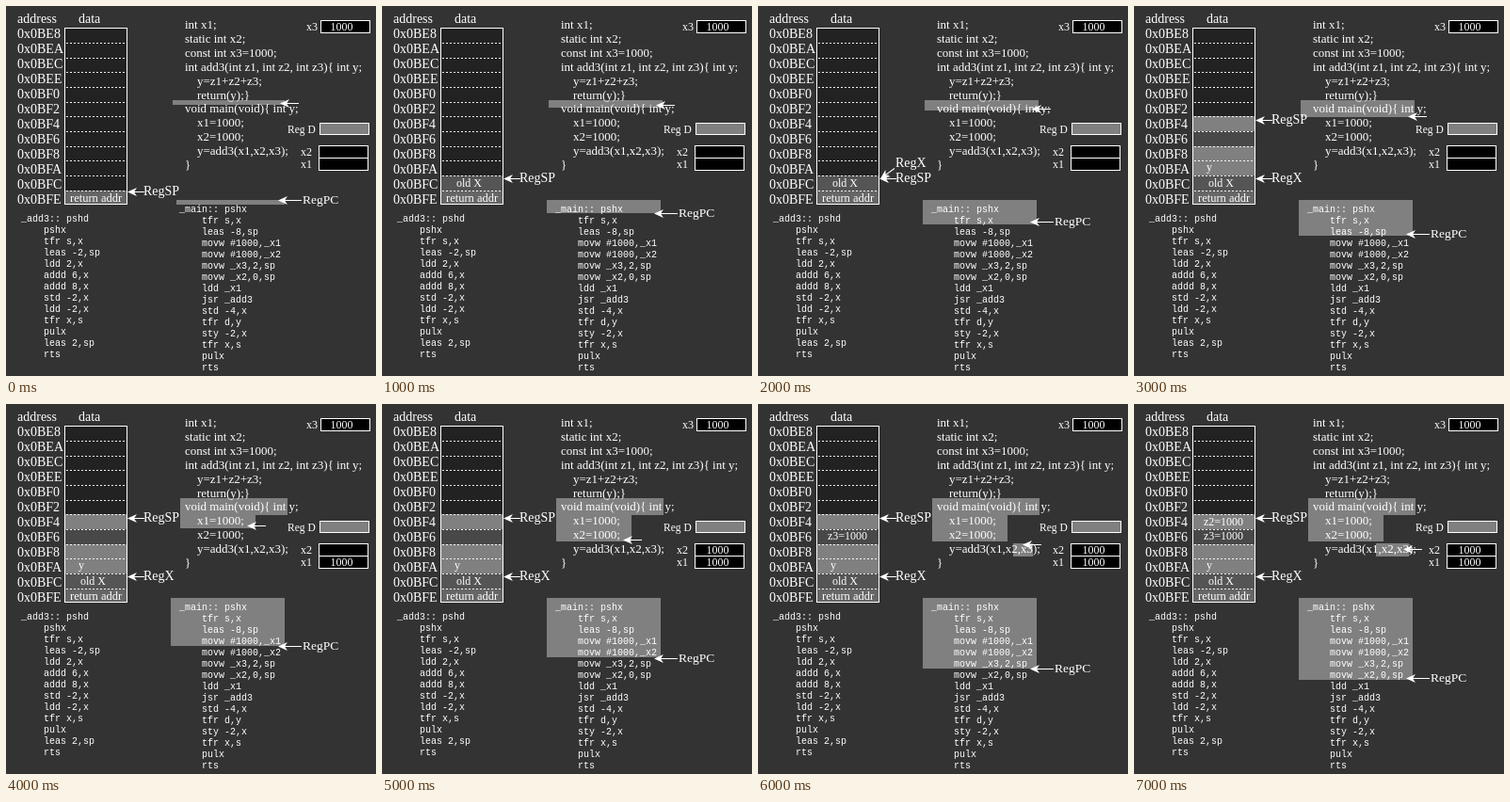
Recreate the animation shown at these times as an HTML page with a canvas. Size 393 by 393 pixels, loop 8000 ms.

```html
<!DOCTYPE html>
<html lang="en">
<head>
<meta charset="utf-8">
<title>Function call on a stack</title>
<style>
html, body { margin: 0; width: 100%; height: 100%; overflow: hidden; background: #333; }
canvas { display: block; }
</style>
</head>
<body>
<canvas id="stage" width="393" height="393"></canvas>
<script>
const ctx = document.getElementById('stage').getContext('2d');
const SERIF = '"Liberation Serif", serif';
const MONO = '"Liberation Mono", monospace';
const GRAY = '#808080';

const sourceLines = [
  'int x1;', 'static int x2;', 'const int x3=1000;',
  'int add3(int z1, int z2, int z3){ int y;',
  '    y=z1+z2+z3;', '    return(y);}', 'void main(void){ int y;',
  '    x1=1000;', '    x2=1000;', '    y=add3(x1,x2,x3);', '}'
];
const addCode = ['_add3:: pshd', 'pshx', 'tfr s,x', 'leas -2,sp', 'ldd 2,x',
  'addd 6,x', 'addd 8,x', 'std -2,x', 'ldd -2,x', 'tfr x,s', 'pulx', 'leas 2,sp', 'rts'];
const mainCode = ['_main:: pshx', 'tfr s,x', 'leas -8,sp', 'movw #1000,_x1',
  'movw #1000,_x2', 'movw _x3,2,sp', 'movw _x2,0,sp', 'ldd _x1', 'jsr _add3',
  'std -4,x', 'tfr d,y', 'sty -2,x', 'tfr x,s', 'pulx', 'rts'];

const mainHead = [185, 100, 299, 118];
const assignments = [185, 118, 265, 146];

// pc: program counter height; end: bottom of the listing highlight;
// src: source highlights; at: source arrow tip
const steps = [
  { pc: 206, end: 211, src: [[177, 100, 296, 105]], at: [291, 103] },
  { pc: 220, end: 220, src: [[177, 100, 298, 108]], at: [291, 105] },
  { pc: 229, end: 232, src: [[177, 100, 298, 111]], at: [291, 109] },
  { pc: 242, end: 244, src: [[177, 100, 298, 118]], at: [291, 117] },
  { pc: 257, end: 257, src: [mainHead, [185, 118, 265, 132]], at: [256, 129] },
  { pc: 270, end: 269, src: [mainHead, assignments], at: [256, 144] },
  { pc: 281, end: 281, src: [mainHead, assignments, [271, 148, 292, 162]], at: [281, 149] },
  { pc: 291, end: 293, src: [mainHead, assignments, [257, 148, 292, 162]], at: [286, 154] }
];

function text(str, x, y, size = 12, family = SERIF) {
  ctx.font = `${size}px ${family}`;
  ctx.fillStyle = '#fff';
  ctx.fillText(str, x, y);
}

function fill(x1, y1, x2, y2, color = GRAY) {
  ctx.fillStyle = color;
  ctx.fillRect(x1, y1, x2 - x1, y2 - y1);
}

function box(x1, y1, x2, y2, color) {
  fill(x1, y1, x2, y2, color);
  ctx.strokeRect(x1 + 0.5, y1 + 0.5, x2 - x1 - 1, y2 - y1 - 1);
}

function arrow(tipX, tipY, tailX, tailY = tipY) {
  ctx.save();
  ctx.translate(tipX, tipY + 0.5);
  ctx.rotate(Math.atan2(tailY - tipY, tailX - tipX));
  ctx.beginPath();
  ctx.moveTo(1, 0);
  ctx.lineTo(Math.hypot(tailX - tipX, tailY - tipY), 0);
  ctx.stroke();
  ctx.beginPath();
  ctx.moveTo(0, 0);
  ctx.lineTo(10, -4.5);
  ctx.lineTo(7, 0);
  ctx.lineTo(10, 4.5);
  ctx.fillStyle = '#fff';
  ctx.fill();
  ctx.restore();
}

function listing(lines, x, y) {
  lines.forEach((line, i) => text(line, i ? x + 24 : x, y + 12 * i, 10, MONO));
}

function drawStack(step) {
  const rowTop = row => Math.min(210, Math.floor(23.6 + 15.7 * row));
  const cell = (row, color) => fill(63, rowTop(row), 128, rowTop(row + 1), color);
  text('address', 12, 18, 14);
  text('data', 77, 18, 14);
  box(62, 23, 129, 211, '#222');
  cell(11, '#666');
  if (step >= 1) cell(10, '#555');
  if (step >= 3) {
    [6, 8, 9].forEach(row => cell(row, GRAY));
    cell(7, '#484848');
  }
  ctx.setLineDash([2, 2]);
  ctx.beginPath();
  for (let row = 0; row < 12; row++) {
    const offset = (0xBE8 + 2 * row).toString(16).toUpperCase();
    text('0x0' + offset, 12, 33.5 + 16 * row, 14);
    if (row > 0) {
      ctx.moveTo(64, rowTop(row) + 0.5);
      ctx.lineTo(128, rowTop(row) + 0.5);
    }
  }
  ctx.stroke();
  ctx.setLineDash([]);

  text('return addr', 68, 208, 12.5);
  if (step >= 1) text('old X', 79, 192);
  if (step >= 3) text('y', 77, 175);
  if (step >= 6) text('z3=1000', 74, 144);
  if (step >= 7) text('z2=1000', 74, 129);
}

function drawStackPointers(step) {
  const label = (name, y) => {
    arrow(129, y, 147);
    text(name, 146, y + 4, 14);
  };
  if (step === 0) label('RegSP', 197);
  else if (step < 3) label('RegSP', 183);
  else {
    label('RegSP', 121);
    label('RegX', 183);
  }
  if (step === 2) {
    arrow(130, 183, 145, 172);
    text('RegX', 146, 171, 14);
  }
}

function drawVariables(step) {
  const variable = (name, labelX, x, y, known) => {
    text(name, labelX, y + 11);
    box(x, y, x + 53, y + 14, '#000');
    if (known) text('1000', 344.5, y + 11);
  };
  variable('x3', 319, 334, 15, true);
  variable('x2', 313, 332, 148, step >= 5);
  variable('x1', 313, 332, 161, step >= 4);
  text('Reg D', 299, 135, 11.5);
  box(333, 124, 386, 137, GRAY);
}

function draw(step) {
  const { pc, end, src, at } = steps[step];
  fill(0, 0, 393, 393, '#333');
  ctx.strokeStyle = '#fff';
  ctx.lineWidth = 1;
  drawStack(step);
  src.forEach(area => fill(...area));
  fill(step ? 175 : 181, 206, 296, end);
  sourceLines.forEach((line, i) => text(line, 190, 24 + 14.9 * i, 13));
  listing(addCode, 16, 229);
  listing(mainCode, 184, 219);
  drawVariables(step);
  drawStackPointers(step);
  arrow(at[0], at[1], at[0] + 20);
  arrow(289, pc, 314);
  text('RegPC', 315, pc + 4, 13.5);
}

function tick() {
  draw(Math.floor(performance.now() / 1000) % steps.length);
  requestAnimationFrame(tick);
}
tick();
</script>
</body>
</html>
```
